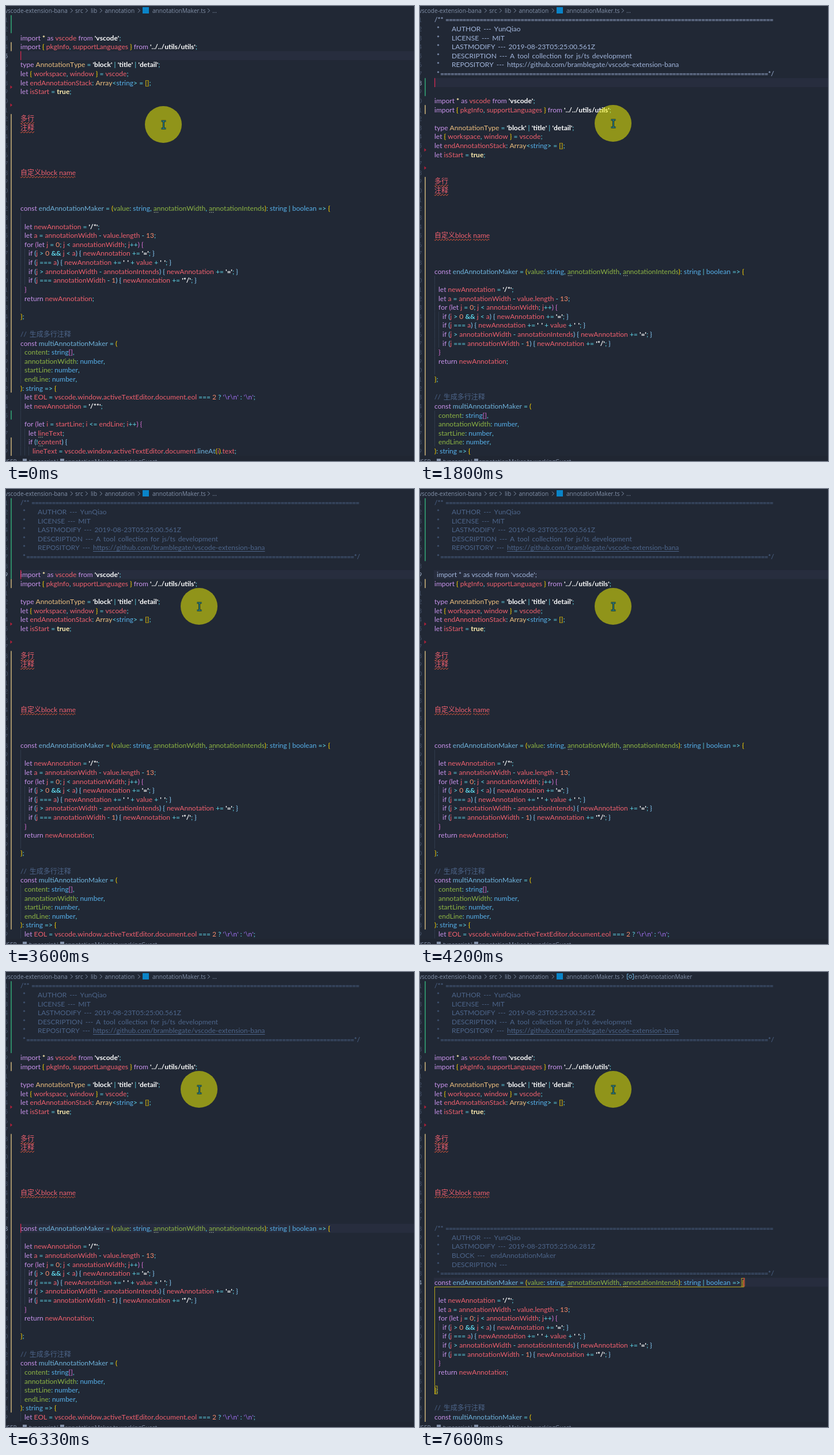
An HTML page with a canvas for the animation above (8 s loop, 708x791 px).

```html
<!DOCTYPE html>
<html lang="en">
<head>
<meta charset="utf-8">
<title>Annotation maker</title>
<style>
html, body { margin: 0; width: 100%; height: 100%; overflow: hidden; background: #212835; }
canvas { display: block; }
</style>
</head>
<body>
<canvas id="stage" width="708" height="791"></canvas>
<script>
(() => {
const ctx = document.getElementById('stage').getContext('2d');
const W = 708, H = 791, LOOP = 8000, FPS = 15;
const LEFT = 25, ROW = 15.62, TOP = 16, EDITOR_END = 782;
const CODE = "Lato, 'Noto Sans CJK SC', 'Noto Sans CJK', sans-serif";
const UI = "10.1px 'Open Sans', sans-serif";

const C = {
  bg: '#212835', line: '#272d3e', keyword: '#c792ea', name: '#f0606e', op: '#5fd7ea',
  string: '#ffffff', number: '#f78c6c', type: '#56b0ea', func: '#6fb3dc', param: '#8db544',
  cls: '#eec07f', bool: '#ffeeb0', comment: '#4d658a', plain: '#a2b6dc', escape: '#a070f0',
  green: '#2f8a68', tan: '#a3926a', red: '#b3203a', caret: '#d0264c', digit: '#414d63',
  crumb: '#8290a8', guide: '#2f3a4b', scope: '#b5a41c', wave: '#e2583c'
};
const BRACKETS = ['#ffd700', '#da70d6', '#87cefa'];
const KEYWORDS = 'import as from type let const for if return'.split(' ');
const MARKS = { '~': C.param, '^': C.type, '@': C.func, '%': C.cls };

// Prefixes: ~ parameter, ^ type, @ function, % class, _ hint dots
const SOURCE = String.raw`

import * as vscode from 'vscode';
import { pkgInfo, supportLanguages } from '../../utils/utils';

type %AnnotationType = 'block' | 'title' | 'detail';
let { workspace, window } = vscode;
let endAnnotationStack: %Array<^string> = [];
let isStart = true;


多行
注释




自定义block name



const @endAnnotationMaker = (~value: ^string, _~annotationWidth, _~annotationIntends): ^string | ^boolean => {
  
  let newAnnotation = '/*';
  let a = annotationWidth - value.length - 13;
  for (let j = 0; j < annotationWidth; j++) {
    if (j > 0 && j < a) { newAnnotation += '='; }
    if (j === a) { newAnnotation += ' ' + value + ' '; }
    if (j > annotationWidth - annotationIntends) { newAnnotation += '='; }
    if (j === annotationWidth - 1) { newAnnotation += '*/'; }
  }
  return newAnnotation;
  
};

// 生成多行注释
const @multiAnnotationMaker = (
  ~content: ^string[],
  ~annotationWidth: ^number,
  ~startLine: ^number,
  ~endLine: ^number,
): ^string => {
  let EOL = vscode.window.activeTextEditor.document.eol === 2 ? '\r\n' : '\n';
  let newAnnotation = '/**';
  
  for (let i = startLine; i <= endLine; i++) {
    let _lineText;
    if (!_content) {
      lineText = vscode.window.activeTextEditor.document.@lineAt(i).text;`;

let depth = 0;

function token(raw) {
  const t = { text: raw, color: C.op, bold: false, dots: false };
  const set = (color, bold = false) => Object.assign(t, { color, bold });
  if (raw[0] === "'" && raw.length > 1) return raw[1] === '\\' ? set(C.escape) : set(C.string, true);
  if (raw.startsWith('//')) return set(C.comment);
  if (/\d/.test(raw)) return set(C.number);
  if (/[(\[{]/.test(raw)) return set(BRACKETS[depth++ % 3]);
  if (/[)\]}]/.test(raw)) return set(BRACKETS[--depth % 3]);
  if (raw === '*') return set(C.bool, true);
  if (raw === '&') return set(C.op, true);
  if (/[A-Za-z\u4e00-\u9fff]/.test(raw)) {
    const [, dots, mark, word] = raw.match(/^(_?)([~^@%]?)(.+)$/);
    t.text = word;
    t.dots = !!dots;
    if (mark) return set(MARKS[mark]);
    if (word === 'true') return set(C.bool, true);
    return set(KEYWORDS.includes(word) ? C.keyword : C.name);
  }
  return t;
}

const FILE = SOURCE.split('\n').map(src => {
  const indent = src.match(/^ */)[0].length;
  const parts = src.slice(indent).match(/'[^']*'|\/\/.*|_?[~^@%]?[A-Za-z]+|\d+|\s+|[\u4e00-\u9fff]+|./g) || [];
  return { indent, tokens: parts.map(token), wavy: /^[\u4e00-\u9fff]/.test(src) };
});

const note = rows => ['/**', ...rows, '*/'].map(text => ({ note: text }));
const HEADER = note([
  'AUTHOR --- YunQiao',
  'LICENSE --- MIT',
  'LASTMODIFY --- 2019-08-23T05:25:00.561Z',
  'DESCRIPTION --- A tool collection for js/ts development',
  'REPOSITORY --- https://github.com/bramblegate/vscode-extension-bana'
]);
const BLOCK = note([
  'AUTHOR --- YunQiao',
  'LASTMODIFY --- 2019-08-23T05:25:06.281Z',
  'BLOCK ---  endAnnotationMaker',
  'DESCRIPTION ---'
]);

const rowTop = n => TOP + ROW * (n - 1);
const baseline = n => Math.round(rowTop(n) + 12.3);

function rect(x, y, w, h, color) {
  ctx.fillStyle = color;
  ctx.fillRect(x, y, w, h);
}

function codeFont(bold) {
  ctx.font = (bold ? '700 ' : '') + '12px ' + CODE;
  ctx.wordSpacing = '1.8px';
}

// Draws text and returns the x after it
function put(text, x, y, color) {
  ctx.fillStyle = color;
  ctx.fillText(text, x, y);
  return x + ctx.measureText(text).width;
}

function wave(x0, x1, y) {
  ctx.beginPath();
  for (let x = x0; x <= x1; x++) ctx.lineTo(x, y + 1.2 * Math.sin((x - LEFT) * Math.PI / 2.5));
  ctx.strokeStyle = C.wave;
  ctx.lineWidth = 1;
  ctx.stroke();
}

function drawCode(row, n, shift, plain) {
  const y = baseline(n);
  for (let i = 0; i < row.indent; i += 2) rect(LEFT + i * 3.5, rowTop(n), 1, ROW, C.guide);
  let x = LEFT + row.indent * 3.5 + shift;
  for (const t of row.tokens) {
    codeFont(t.bold && !plain);
    const end = put(t.text, x, y, plain ? C.plain : t.color);
    if (row.wavy && t.text.trim()) wave(x, end, y + 3.5);
    if (t.dots) for (let k = 0; k < 3; k++) rect(x + 1 + k * 3, y + 2, 1.3, 1.3, '#a9b3a0');
    x = end;
  }
  return x;
}

function drawNote(text, n, color, link) {
  const y = baseline(n), first = text === '/**', last = text === '*/';
  codeFont(false);
  put(first ? '/**' : '*', first ? LEFT : 29, y, color);
  if (first || last) {
    ctx.letterSpacing = '-1.04px';
    put('='.repeat(96), first ? 44 : 35, y, color);
    ctx.letterSpacing = '0px';
    if (last) put('*/', 604, y, color);
    return;
  }
  const cut = text.indexOf('https');
  if (cut < 0) {
    put(text, 55, y, color);
    return;
  }
  const x = put(text.slice(0, cut), 55, y, color);
  const end = put(text.slice(cut), x, y, color);
  if (link) rect(x, y + 2, end - x, 1, color);
}

function drawCrumbs(symbol) {
  ctx.font = UI;
  ctx.wordSpacing = '0px';
  const y = 11.5;
  put('vscode-extension-bana', -2, y, C.crumb);
  put('src', 120, y, C.crumb);
  put('lib', 147, y, C.crumb);
  put('annotation', 171.5, y, C.crumb);
  put('annotationMaker.ts', 254, y, C.crumb);
  ctx.strokeStyle = C.crumb;
  ctx.lineWidth = 1;
  for (const x of [112, 138, 163, 229, 350]) {
    ctx.beginPath();
    ctx.moveTo(x, 4.5);
    ctx.lineTo(x + 3.5, 8);
    ctx.lineTo(x, 11.5);
    ctx.stroke();
  }
  rect(237, 2, 11, 11, '#0a84c8');
  if (!symbol) {
    put('…', 358, y, C.crumb);
    return;
  }
  put('endAnnotationMaker', 372, y, C.crumb);
  ctx.strokeStyle = C.func;
  ctx.beginPath();
  ctx.moveTo(362, 3.5); ctx.lineTo(359.5, 3.5); ctx.lineTo(359.5, 12.5); ctx.lineTo(362, 12.5);
  ctx.moveTo(368, 3.5); ctx.lineTo(370.5, 3.5); ctx.lineTo(370.5, 12.5); ctx.lineTo(368, 12.5);
  ctx.moveTo(367.5, 8); ctx.arc(365, 8, 2.5, 0, 7);
  ctx.stroke();
}

function drawFooter() {
  rect(0, EDITOR_END, W, H - EDITOR_END, '#202632');
  ctx.font = UI;
  ctx.wordSpacing = '0px';
  put('USER', -6, 796, C.crumb);
  put('typescript|', 40, 796, C.crumb);
  put('annotationMaker.ts workingGuest', 102, 796, C.crumb);
  rect(29, 787, 7, 4, C.crumb);
  rect(94, 787, 7, 4, C.crumb);
}

// Last value whose start tick has been reached
const at = (tick, steps) => steps.reduce((v, [start, value]) => tick >= start ? value : v, 0);

function drawGutter(tick, off, extra, caret) {
  const bar = (a, b, color) => rect(8, rowTop(a), 2, rowTop(b + 1) - rowTop(a), color);
  const greenEnd = at(tick, [[0, 0], [30, 9], [56, 8], [57, 7], [67, 8]]);
  if (greenEnd) bar(1, greenEnd, C.green);
  else bar(off + 1, off + 2, C.green);
  bar(off + 4, off + 4, C.tan);
  bar(off + 12, off + 42 + extra, C.tan);
  bar(off + 45 + extra, off + 45 + extra, C.green);
  bar(off + 48 + extra, off + 52 + extra, C.tan);
  for (const n of [9, 11]) {
    const y = rowTop(off + n);
    ctx.fillStyle = C.red;
    ctx.beginPath();
    ctx.moveTo(7.5, y - 3);
    ctx.lineTo(11, y);
    ctx.lineTo(7.5, y + 3);
    ctx.fill();
  }
  codeFont(false);
  ctx.textAlign = 'right';
  for (let n = 1; n < 50; n++) put(String(n), 3.5, baseline(n), n === caret ? '#93a2ba' : C.digit);
  ctx.textAlign = 'left';
}

function drawPointer(x, y) {
  ctx.fillStyle = 'rgba(255,255,0,.5)';
  ctx.beginPath();
  ctx.arc(x, y, 32, 0, 7);
  ctx.fill();
  const beam = (width, color) => {
    ctx.strokeStyle = color;
    ctx.lineWidth = width;
    ctx.beginPath();
    ctx.moveTo(x - 3.5, y - 6); ctx.lineTo(x + 4.5, y - 6);
    ctx.moveTo(x - 3.5, y + 7); ctx.lineTo(x + 4.5, y + 7);
    ctx.moveTo(x + .5, y - 6); ctx.lineTo(x + .5, y + 7);
    ctx.stroke();
  };
  beam(3, '#14262c');
  beam(1, '#2fa09a');
}

const CARET = [[0, 5], [8, 4], [11, 3], [14, 2], [16, 1], [27, 8], [45, 9], [48, 10], [54, 9],
  [57, 8], [63, 9], [70, 10], [90, 29], [94, 28], [113, 34]];

function draw(ms) {
  const tick = Math.floor((ms + 5) * FPS / 1000);
  const within = (a, b) => tick >= a && tick < b;
  const off = at(tick, [[0, 0], [27, 7], [54, 6], [57, 5], [63, 6]]);
  const extra = tick >= 113 ? BLOCK.length : 0;
  const caret = within(77, 90) ? 10 + Math.round(1.46 * (tick - 76)) : at(tick, CARET);
  const blinkOff = within(24, 27) || within(34, 42) || within(63, 67) || within(108, 113);

  let rows = FILE;
  if (off) rows = [...HEADER, ...FILE.slice(7 - off)];
  if (extra) rows = [...rows.slice(0, 27), ...BLOCK, ...rows.slice(27)];

  ctx.fontKerning = 'none';
  ctx.textBaseline = 'alphabetic';
  rect(0, 0, W, H, C.bg);

  ctx.save();
  ctx.beginPath();
  ctx.rect(0, TOP, W, EDITOR_END - TOP);
  ctx.clip();
  rect(24, rowTop(caret), W - 24, ROW, C.line);
  drawGutter(tick, off, extra, caret);

  let scopeEnd = 0;
  rows.slice(0, 49).forEach((row, i) => {
    const n = i + 1;
    if (row.note) {
      const fresh = i < 7 ? tick < 28 : tick < 114;
      drawNote(row.note, n, fresh ? C.plain : C.comment, tick >= 43);
      return;
    }
    const first = row === FILE[2];
    const end = drawCode(row, n, first && within(63, 67) ? 4 : 0, first && tick === 63);
    if (row === FILE[21]) scopeEnd = end;
  });

  const open = off + 22 + extra, close = open + 12;
  if (within(90, 94) || tick >= 102) {
    rect(LEFT, rowTop(open + 1), scopeEnd - LEFT, 1, C.scope);
    rect(LEFT, rowTop(open + 1), 1, rowTop(close) - rowTop(open + 1), C.scope);
  }
  if (tick >= 101) {
    ctx.strokeStyle = C.scope;
    ctx.lineWidth = 1;
    ctx.strokeRect(scopeEnd - 4.5, rowTop(open) + 1, 5, ROW - 2);
    ctx.strokeRect(LEFT + .5, rowTop(close) + 1, 4.5, ROW - 2);
  }
  if (!blinkOff) rect(tick >= 101 ? scopeEnd - 1 : LEFT, rowTop(caret), 1.3, ROW, C.caret);
  ctx.restore();

  drawCrumbs(within(92, 95) || tick >= 103);
  drawFooter();
  const p = Math.min(1, Math.max(0, (tick - 3) / 4));
  drawPointer(273 + 62 * p, 206 - 2 * p);
}

const start = performance.now();
function frame() {
  draw((performance.now() - start) % LOOP);
  requestAnimationFrame(frame);
}
frame();
})();
</script>
</body>
</html>
```
